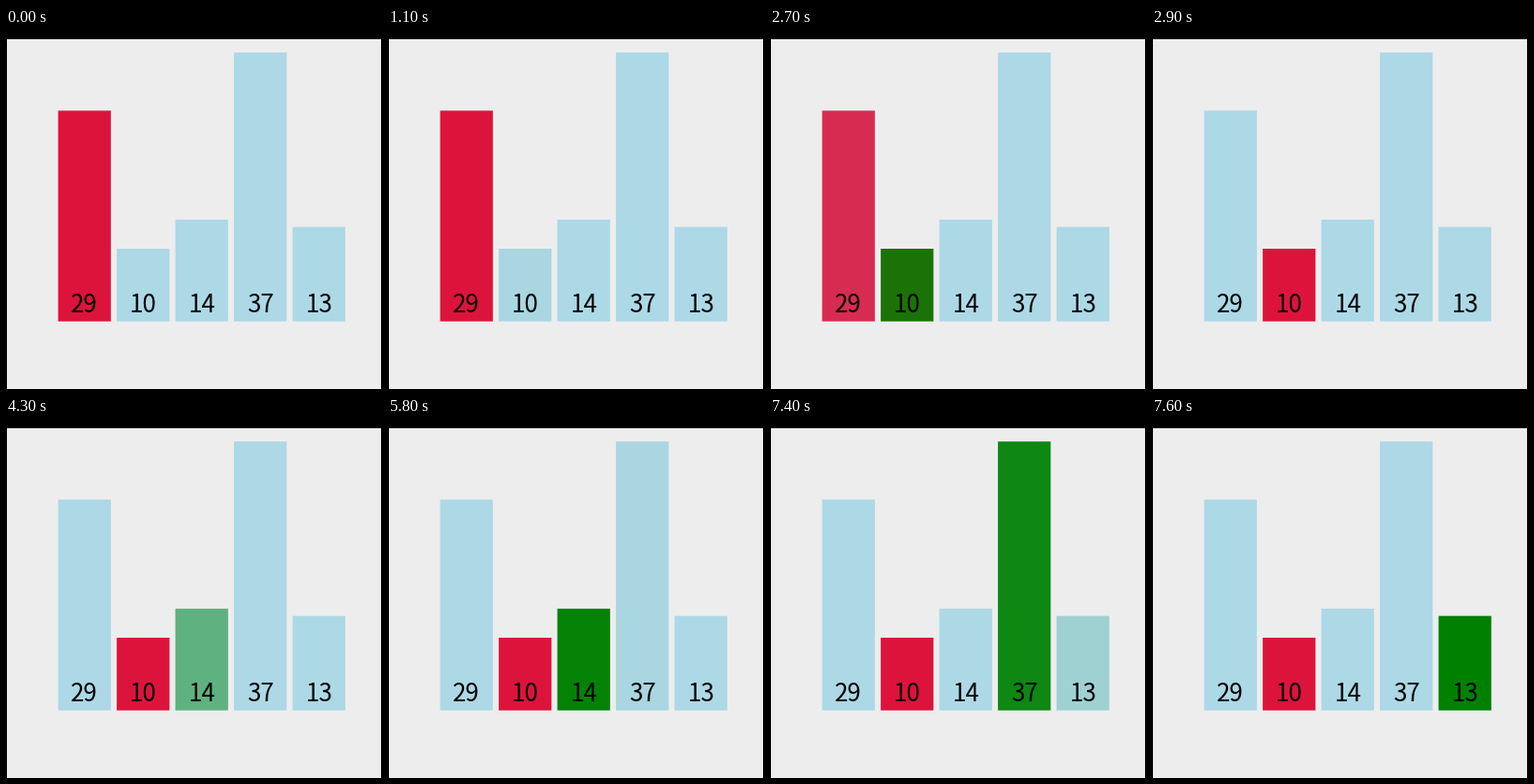
Write a matplotlib script that moves like this. It is 401x386 px and loops after 8 s.

```python
import numpy as np
import matplotlib.pyplot as plt
from matplotlib.animation import FuncAnimation
from matplotlib.colors import to_rgb
from matplotlib.patches import Rectangle

W, H, DPI = 401, 386, 64
LOOP, STEP = 8000, 100
FADE = 250

VALUES = [29, 10, 14, 37, 13]
LEFT, PITCH, BAR_W = 55.6, 62.5, 56.25
BASE, UNIT = 313.7, 7.77
TEXT_Y, TEXT_PX = 304, 26

COLORS = {
    "b": np.array(to_rgb("lightblue")),   # idle
    "r": np.array(to_rgb("crimson")),     # current minimum
    "g": np.array(to_rgb("green")),       # being compared
}

# Selection-sort scan: bar states and the time each one starts to fade in
STATES = ["rbbbb", "rgbbb", "brbbb", "brgbb", "brbgb", "brbbg"]
STARTS = [1055, 2622, 4180, 5756, 7332]


def ease(t):
    t = min(max(t, 0.0), 1.0)
    return 4 * t ** 3 if t < 0.5 else 1 - 4 * (1 - t) ** 3


def bar_color(i, ms):
    color = COLORS[STATES[0][i]]
    for start, state in zip(STARTS, STATES[1:]):
        k = ease((ms - start) / FADE)
        color = color + (COLORS[state[i]] - color) * k
    return color


fig = plt.figure(figsize=(W / DPI, H / DPI), dpi=DPI, facecolor="black")
ax = fig.add_axes([0, 0, 1, 1])
ax.set_xlim(0, W)
ax.set_ylim(H, 0)
ax.axis("off")

ax.add_patch(Rectangle((1, 12), W - 2, H - 12, fc="#ededed", lw=0))

bars = []
for i, value in enumerate(VALUES):
    x = LEFT + i * PITCH
    height = value * UNIT
    bar = Rectangle((x, BASE - height), BAR_W, height, lw=0, snap=False)
    bars.append(ax.add_patch(bar))
    ax.text(x + BAR_W / 2, TEXT_Y, str(value), ha="center", va="baseline",
            family="Noto Sans CJK JP", size=TEXT_PX * 72 / DPI, color="black")


def update(frame):
    ms = frame * STEP
    for i, bar in enumerate(bars):
        bar.set_facecolor(bar_color(i, ms))
    return bars


# The scan goes on: bar 10 takes over as minimum in the same fade it turns from green
STATES[2] = "brbbb"

anim = FuncAnimation(fig, update, frames=LOOP // STEP, interval=STEP,
                     init_func=lambda: update(0), repeat=True, repeat_delay=0)
plt.show()
```
